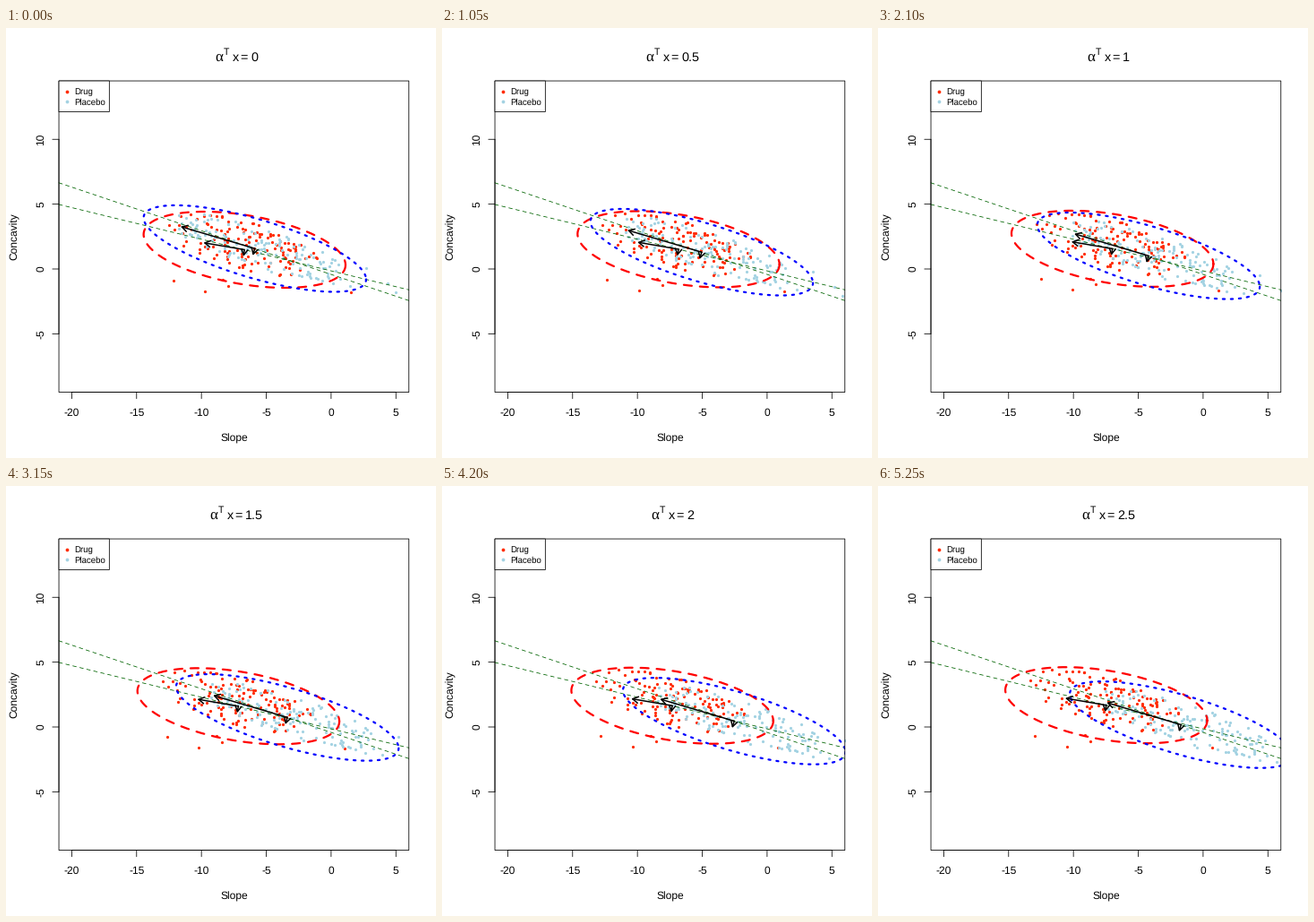
Recreate the animation shown at these times as a matplotlib script. Size 480 px wide and 480 px high, loop 6300 ms.

```python
import numpy as np
import matplotlib.pyplot as plt
from matplotlib.animation import FuncAnimation
from matplotlib.patches import Rectangle
from matplotlib.transforms import Affine2D

plt.rcParams["font.family"] = "Liberation Sans"
plt.rcParams["text.hinting"] = "none"

SIZE = 480
STEPS = 6
LEFT, RIGHT, TOP, BOTTOM = 59.04, 449.76, 59.04, 406.56
X0, Y0, UNIT = 362.9, 269.0, 14.475
THIN = 0.8
RED, SKY = "#ff2a00", "#a3d2e2"

# dpi 72 makes one point equal one pixel
fig = plt.figure(figsize=(SIZE / 72, SIZE / 72), dpi=72, facecolor="white")
ax = fig.add_axes([0, 0, 1, 1])
ax.set_xlim(0, SIZE)
ax.set_ylim(SIZE, 0)
ax.axis("off")


def box(w, h, z, fill):
    rect = Rectangle((LEFT, TOP), w, h, fc=fill, ec="black", lw=THIN,
                     zorder=z, snap=False)
    return ax.add_patch(rect)


def line(xs, ys, color="black", lw=THIN, **kw):
    art, = ax.plot(xs, ys, color=color, lw=lw, snap=False,
                   solid_capstyle="round", dash_capstyle="round", **kw)
    return art


def label(x, y, text, size=12, ha="center", **kw):
    return ax.text(x, y, text, fontsize=size, ha=ha, va="baseline",
                   rotation_mode="anchor", **kw)


class Arm:
    """One treatment group; it slides as a whole along its own line."""

    def __init__(self, center, half, rho, velocity):
        self.center = np.array(center)
        self.half, self.rho = half, rho
        self.velocity = velocity
        self.shift = Affine2D()
        self.trans = self.shift + ax.transData

    def draw(self, xs, ys, **kw):
        art = line(xs, ys, transform=self.trans, **kw)
        art.set_clip_path(panel)

    def dots(self, seed, n, center, half, rho, outliers, color, z):
        rng = np.random.default_rng(seed)
        r = rng.random(n) ** 0.6
        t = rng.random(n) * 2 * np.pi
        x = center[0] + half[0] * r * np.cos(t)
        y = center[1] + half[1] * r * np.sin(t + np.arcsin(rho))
        far_x, far_y = zip(*outliers)
        self.draw([*x, *far_x], [*y, *far_y], color=color, ls="none",
                  marker="o", ms=3.2, mew=0, zorder=z)

    def ellipse(self, color, dashes):
        t = np.linspace(0, 2 * np.pi, 400)
        x = self.center[0] + self.half[0] * np.cos(t)
        y = self.center[1] + self.half[1] * np.sin(t + np.arcsin(self.rho))
        self.draw(x, y, color=color, lw=2.25, ls=(0, dashes), zorder=4)

    def arrow(self, angle, length):
        tip = self.center + length * np.array([np.cos(angle), np.sin(angle)])
        head = [tip - 7.2 * np.array([np.cos(angle + s), np.sin(angle + s)])
                for s in (-np.pi / 6, np.pi / 6)]
        self.draw(*zip(self.center, tip), lw=1.5, zorder=5)
        self.draw(*zip(head[0], tip, head[1]), lw=1.5, zorder=5)

    def axes(self, major, minor):
        a, b = self.half
        tilt = 0.5 * np.arctan2(2 * self.rho * a * b, a * a - b * b)
        self.arrow(tilt + np.pi, major)
        self.arrow(tilt + np.pi / 2, minor)

    def move(self, k):
        self.shift.clear().translate(k * self.velocity[0], k * self.velocity[1])


panel = box(RIGHT - LEFT, BOTTOM - TOP, 6, "none")

drug = Arm((266.3, 247.5), (112.7, 42.5), 0.40, (-2.3, -0.56))
drug.dots(4, 125, (264, 242), (86, 35), 0.6,
          [(186.5, 281.5), (222, 293.5), (384.5, 294.5), (248, 287.5),
           (242, 281)], RED, 1)
drug.ellipse("#ff0000", (4, 4))
drug.axes(45, 6)

placebo = Arm((277.8, 246.2), (124.2, 48.3), 0.71, (12.1, 4.05))
placebo.dots(9, 145, (285, 246), (106, 40), 0.82,
             [(401.5, 268), (425.5, 285), (434.5, 294.5), (384, 287.5)],
             SKY, 2)
placebo.ellipse("#0000ff", (1, 3))
placebo.axes(85, 6.5)

for y_left, y_right in ((172.8, 304.3), (197, 292.3)):
    line([LEFT, RIGHT], [y_left, y_right], color="#006400",
         ls=(0, (5, 5)), zorder=3)

# axes
x_ticks, y_ticks = range(-20, 6, 5), range(-5, 11, 5)
for v in x_ticks:
    x = X0 + v * UNIT
    line([x, x], [BOTTOM, BOTTOM + 7.2])
    label(x, 433, str(v))
for v in y_ticks:
    y = Y0 - v * UNIT
    line([LEFT - 7.2, LEFT], [y, y])
    label(42, y, str(v), rotation=90)
line([X0 - 20 * UNIT, X0 + 5 * UNIT], [BOTTOM, BOTTOM])
line([LEFT, LEFT], [Y0 - 10 * UNIT, Y0 + 5 * UNIT])
label(254.4, 462, "Slope")
label(12.5, 233, "Concavity", rotation=90)

# legend
box(56.3, 34.5, 7, "white")
for name, y, color in (("Drug", 70.6, RED), ("Placebo", 82.1, SKY)):
    line([67.6], [y], color=color, marker="o", ms=3.8, mew=0, zorder=8)
    label(76, y + 3.6, name, 9.6, "left", zorder=8)

# title: each part has an offset from the left end
alpha = label(0, 37, "α", 17, "left", family="Liberation Serif")
power = label(0, 30.5, "T", 10.5, "left")
var, equals, number = (label(0, 37, s, 14.4, "left") for s in ("x", "=", ""))
title = {alpha: 0, power: 9.2, var: 18.7, equals: 28, number: 39.7}


def update(k):
    value = f"{k / 2:g}"
    start = 233.7 if len(value) == 1 else 227.7
    number.set_text(value)
    for part, dx in title.items():
        part.set_x(start + dx)
    drug.move(k)
    placebo.move(k)
    return []


anim = FuncAnimation(fig, update, frames=STEPS, interval=1050,
                     repeat=True, repeat_delay=0, blit=False)
plt.show()
```
